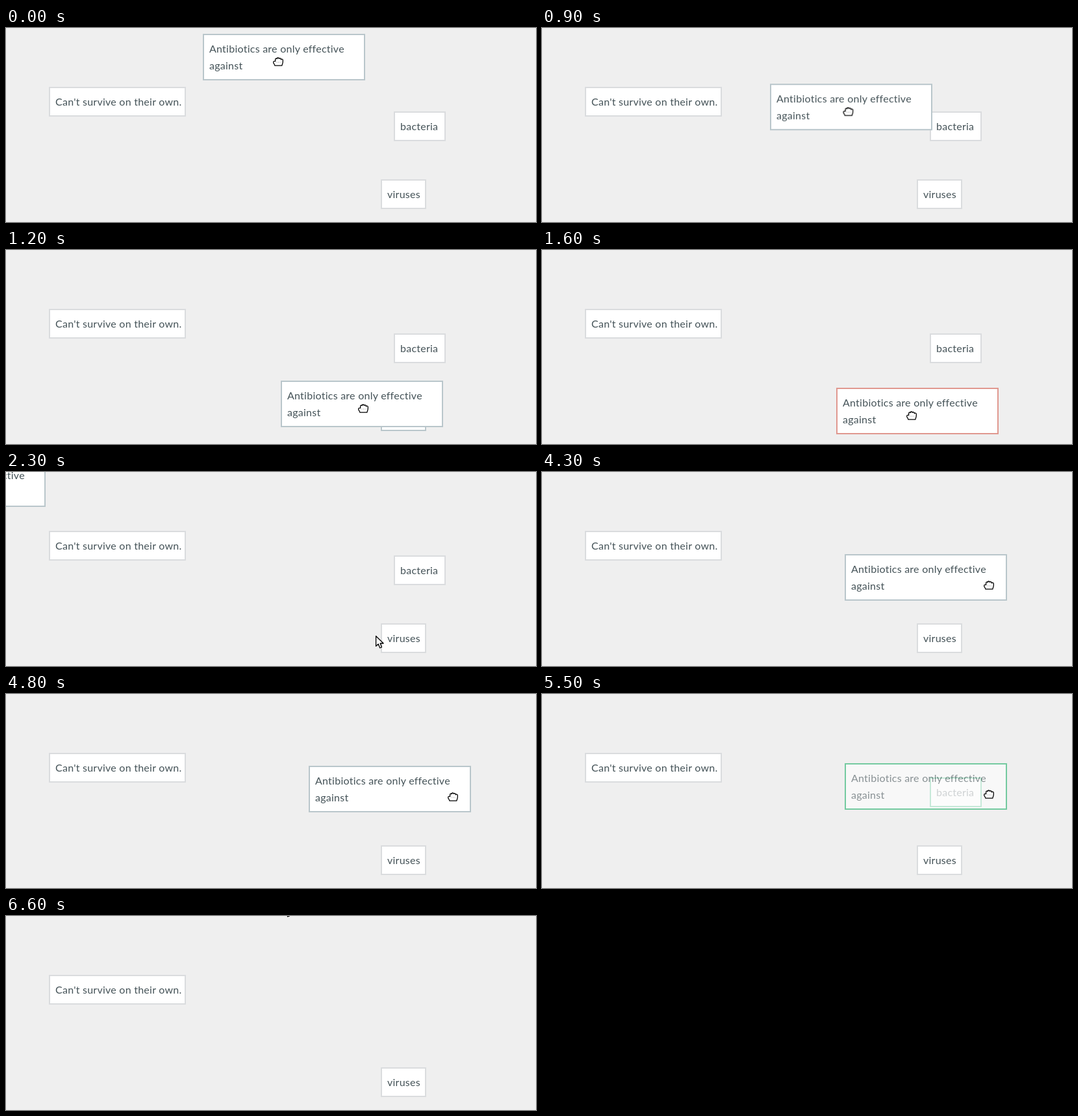
Animation, 816 px wide and 300 px high, one loop 6800 ms. Source, as an HTML page:

```html
<!DOCTYPE html>
<html lang="en">
<head>
<meta charset="utf-8">
<title>Matching cards</title>
<style>
  :root {
    --line: #dadcde;
    --active: #b9c6cb;
    --wrong: #ff725b;
    --wrong-mid: #e0988f;
    --right: #23b26d;
    --right-mid: #6cbd9a;
    --loop: 6800ms;
  }
  html, body { margin: 0; width: 100%; height: 100%; overflow: hidden; }
  body { position: relative; background: #efefef; }

  .card {
    position: absolute;
    box-sizing: border-box;
    height: 46px;
    padding: 8px;
    border: 2px solid var(--line);
    background: #fff;
    color: #455358;
    font: 16px/26px Lato, "Open Sans", sans-serif;
    letter-spacing: .25px;
    white-space: nowrap;
  }
  .own { left: 66px; top: 91px; width: 211px; }
  .bacteria {
    left: 597px; top: 129px; width: 80px;
    animation: match var(--loop) step-end infinite, fade var(--loop) step-end infinite;
  }
  .viruses {
    left: 577px; top: 234px; width: 70px;
    animation: mismatch var(--loop) step-end infinite;
  }
  .dragged {
    left: 0; top: 0; width: 250px; height: 72px;
    border-color: var(--active);
    animation: drag var(--loop) step-end infinite,
               verdict var(--loop) step-end infinite,
               fade var(--loop) step-end infinite;
  }

  .cursor {
    position: absolute; left: 0; top: 0;
    width: 1px; height: 1px;
    overflow: visible;
    animation: point var(--loop) step-end infinite;
  }
  .cursor path { fill: #fff; stroke: #000; stroke-width: 1.3; stroke-linejoin: round; }
  .cursor .dots { stroke: #999; stroke-width: 1; stroke-dasharray: 1 1.5; }
  .fist { animation: fist var(--loop) step-end infinite; }
  .palm { animation: palm var(--loop) step-end infinite; }
  .arrow { animation: arrow var(--loop) step-end infinite; }

  /* One tenth of a second is 1.47% of the loop; steps(n) spans n tenths. */
  @keyframes drag {
    0% { transform: translate(303px, 9px); }
    10.29% { transform: translate(303px, 9px); animation-timing-function: steps(5); }
    17.64% { transform: translate(423px, 202px); animation-timing-function: steps(2); }
    20.58% { transform: translate(450px, 209px); }
    22.05% { transform: translate(453px, 213px); }
    23.52% { transform: translate(453px, 213px); animation-timing-function: steps(5); }
    30.88% { transform: translate(-189px, -18px); }
    58.82% { transform: translate(-189px, -18px); animation-timing-function: steps(3); }
    63.23% { transform: translate(466px, 127px); }
    64.7% { transform: translate(466px, 127px); animation-timing-function: steps(5); }
    72.05%, 100% { transform: translate(466px, 107px); }
  }
  @keyframes point {
    0% { transform: translate(419px, 49px); }
    10.29% { transform: translate(419px, 49px); animation-timing-function: steps(5); }
    17.64% { transform: translate(550px, 242px); animation-timing-function: steps(3); }
    22.05% { transform: translate(569px, 253px); }
    41.17% { transform: translate(569px, 253px); animation-timing-function: steps(4); }
    47.05% { transform: translate(8px, 5px); }
    48.52% { transform: translate(37px, 27px); }
    55.88% { transform: translate(33px, 27px); }
    58.82% { transform: translate(33px, 27px); animation-timing-function: steps(3); }
    63.23% { transform: translate(688px, 172px); }
    64.7% { transform: translate(688px, 172px); animation-timing-function: steps(5); }
    72.05% { transform: translate(688px, 152px); }
    88.23% { transform: translate(688px, 152px); animation-timing-function: steps(6); }
    97.05%, 100% { transform: translate(427px, -18px); }
  }
  @keyframes verdict {
    0% { border-color: var(--active); }
    23.52% { border-color: var(--wrong-mid); }
    25% { border-color: var(--wrong); }
    32.35% { border-color: var(--wrong-mid); }
    33.82% { border-color: var(--active); }
    77.94% { border-color: var(--right-mid); }
    79.41%, 100% { border-color: var(--right); }
  }
  @keyframes mismatch {
    0% { border-color: var(--line); }
    16.17% { border-color: var(--active); }
    23.52% { border-color: var(--wrong-mid); }
    25% { border-color: var(--wrong); }
    32.35% { border-color: var(--wrong-mid); }
    33.82%, 100% { border-color: var(--line); }
  }
  @keyframes match {
    0% { border-color: var(--line); }
    63.23% { border-color: var(--active); }
    77.94% { border-color: var(--right-mid); }
    79.41%, 100% { border-color: var(--right); }
  }
  @keyframes fade {
    0% { opacity: 1; }
    77.94% { opacity: 1; animation-timing-function: steps(5); }
    85.29%, 100% { opacity: 0; }
  }
  @keyframes fist {
    0%, 54.41% { opacity: 1; }
    25%, 85.29%, 100% { opacity: 0; }
  }
  @keyframes palm {
    0%, 54.41%, 100% { opacity: 0; }
    47.05% { opacity: 1; }
  }
  @keyframes arrow {
    0%, 47.05% { opacity: 0; }
    25%, 85.29%, 100% { opacity: 1; }
  }
</style>
</head>
<body>
  <div class="card own">Can't survive on their own.</div>
  <div class="card bacteria">bacteria</div>
  <div class="card viruses">viruses</div>
  <div class="card dragged">Antibiotics are only effective<br>against</div>

  <svg class="cursor" aria-hidden="true">
    <g class="fist" transform="translate(-8 -4)">
      <path d="M3.6 6.6C1.4 5.8.7 6.8.7 8.2C.7 10 2.6 10.6 2.9 13.2H13.8C14 11.2 15.3 10 15.3 7.2V4.6C15.2 2.9 12.6 2.7 12.4 3.8C12.3 1.4 9.5 1.2 9.2 2.4C8.9.4 6.4.6 6.3 2.6C5.7 1.6 3.6 1.9 3.6 3.9Z"/>
      <path class="dots" d="M5.5 8H12.5"/>
    </g>
    <g class="palm" transform="translate(-8 -4)">
      <path d="M4.2 9.2L2.6 7.4C1.4 6.4 0 7.6 1 9L4.6 15.3H13L14.8 10.4L15.3 5C15.3 3.4 13.2 3.4 13 5L12.5 7.4L12.4 2.6C12.2 1 10 1 9.9 2.6L9.5 7L8.6 1.7C8.2.2 6.1.6 6.4 2.2L6.8 7.2L5.2 3.4C4.4 2 2.6 2.8 3.1 4.4Z"/>
    </g>
    <g class="arrow">
      <path d="M.6.8V16.4L4.2 13L6.7 19L9.5 17.8L7.1 12H12.1Z"/>
    </g>
  </svg>
</body>
</html>
```
